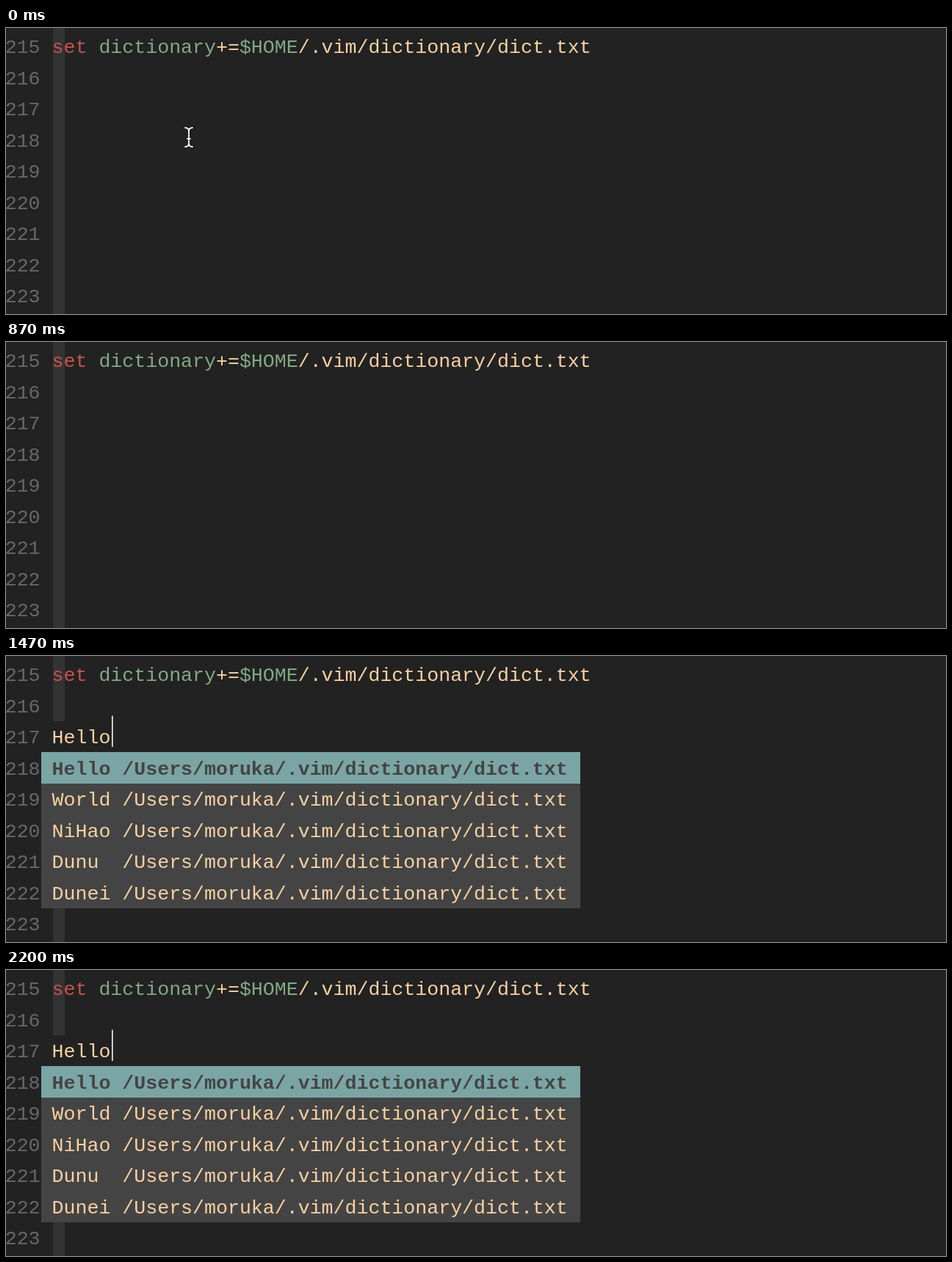
Animation of 1280x390 px, one loop 2590 ms. Source, as an HTML page with a canvas:

```html
<!DOCTYPE html>
<html lang="en">
<head>
<meta charset="utf-8">
<title>Dictionary completion</title>
<style>
  html, body { margin: 0; width: 100%; height: 100%; overflow: hidden; background: #222; }
  canvas { display: block; }
</style>
</head>
<body>
<canvas id="stage" width="1280" height="390"></canvas>
<script>
const ctx = document.getElementById('stage').getContext('2d');
const LOOP = 2590;
const TICK = 200 / 3;
const COL = 15.96;
const ROW = 42.5;
const TOP = 3.8;
const LEFT = -1.3;
const BASE = 30.2;
const FONT = '26.6px "Liberation Mono", "Courier New", monospace';

const color = {
  bg: '#222222', guide: '#333333', number: '#686868',
  red: '#c5534f', green: '#82a985', text: '#fad1a3',
  menu: '#444444', picked: '#7ba5a5', caret: '#f0f0f0'
};

const words = ['Hello', 'World', 'NiHao', 'Dunu', 'Dunei'];
const path = '/Users/moruka/.vim/dictionary/dict.txt';

const rowY = row => Math.round(TOP + row * ROW);

function rect(x, y, w, h, fill) {
  ctx.fillStyle = fill;
  ctx.fillRect(x, y, w, h);
}

function write(str, col, row, fill, bold) {
  ctx.font = (bold ? 'bold ' : '') + FONT;
  ctx.fillStyle = fill;
  ctx.fillText(str, LEFT + col * COL, TOP + row * ROW + BASE);
}

function drawEditor(completed) {
  rect(0, 0, 1280, 390, color.bg);
  rect(64, 0, 16, 390, color.guide);
  if (completed) rect(64, rowY(2), 16, rowY(3) - rowY(2), color.bg);
  for (let i = 0; i < 9; i++) write(String(215 + i), 0, i, color.number);
  write('set', 4, 0, color.red);
  write('dictionary', 8, 0, color.green);
  write('+=', 18, 0, color.text);
  write('$HOME', 20, 0, color.green);
  write('/.vim/dictionary/dict.txt', 25, 0, color.text);
}

function drawMenu() {
  write(words[0], 4, 2, color.text);
  rect(48, rowY(3), 734, rowY(8) - rowY(3), color.menu);
  rect(48, rowY(3), 734, rowY(4) - rowY(3), color.picked);
  words.forEach((word, i) => {
    const fill = i ? color.text : color.menu;
    write(word.padEnd(6) + path, 4, 3 + i, fill, i === 0);
  });
}

function drawCaret(x, alpha) {
  ctx.globalAlpha = alpha;
  rect(x, 81.5, 1.6, 42.5, color.caret);
  ctx.globalAlpha = 1;
}

function drawPointer(x, y) {
  const beam = new Path2D(
    'M-5-13Q0-13 0-8V8Q0 13-5 13M5-13Q0-13 0-8M0 8Q0 13 5 13M-2 2H2');
  ctx.save();
  ctx.translate(x, y);
  ctx.lineCap = 'round';
  ctx.strokeStyle = '#111';
  ctx.lineWidth = 3.6;
  ctx.translate(0.8, 0);
  ctx.stroke(beam);
  ctx.translate(-0.8, 0);
  ctx.strokeStyle = '#fff';
  ctx.lineWidth = 1.8;
  ctx.stroke(beam);
  ctx.restore();
}

function caretAlpha(t) {
  if (t >= 70 && t < 130) return 0.5;
  return (t >= 130 && t < 530) || (t >= 1000 && t < 1130) ? 1 : 0;
}

function render(t) {
  const completed = t >= 1270;
  drawEditor(completed);
  if (completed) {
    drawMenu();
    drawCaret(144, 1);
  } else {
    drawCaret(64, caretAlpha(t));
  }

  if (t < 870) {
    drawPointer(249, 149);
  } else if (t >= 1730 && t < 2200) {
    // The pointer wakes up and leaves through the top edge.
    const step = Math.floor((t - 1730) / TICK);
    const p = Math.pow(step / 7, 1.5);
    drawPointer(249.5 + 260 * p, 147 - 165 * p);
  }
}

const start = performance.now();
function loop() {
  render((performance.now() - start) % LOOP);
  requestAnimationFrame(loop);
}
loop();
</script>
</body>
</html>
```
